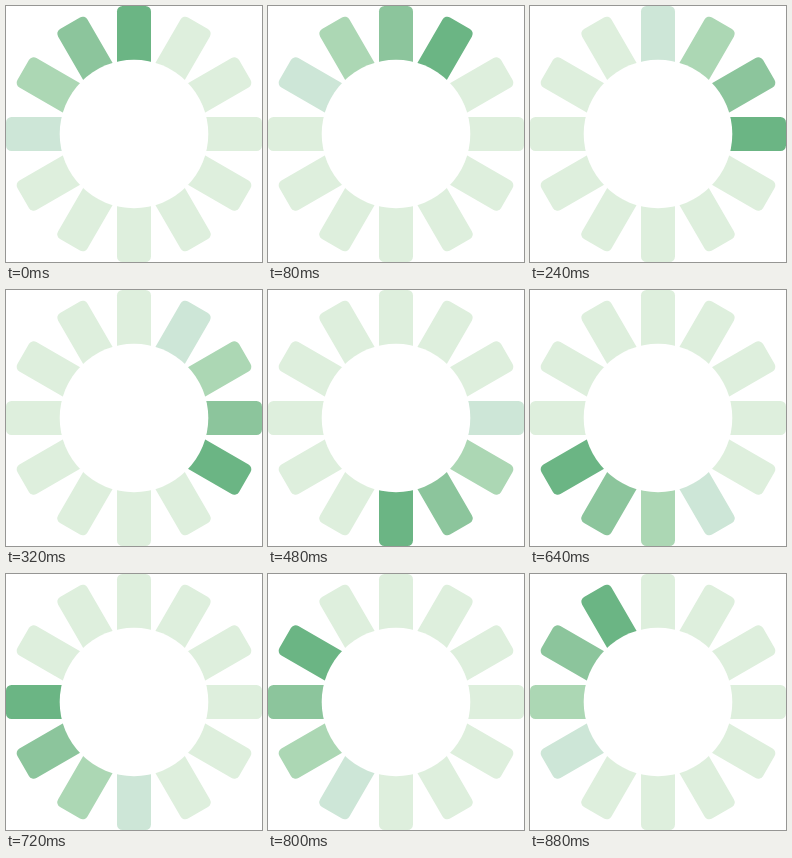
An HTML page that plays this animation: 256x256 px, repeating every 960 ms.

```html
<!DOCTYPE html>
<html lang="en">
<head>
<meta charset="utf-8">
<title>Loading spinner</title>
<style>
  html, body { margin: 0; width: 100%; height: 100%; overflow: hidden; background: #fff; }
  svg { display: block; width: 100%; height: 100%; }
  .spoke {
    fill: #deefdd;
    transform-origin: 128px 128px;
    transform: rotate(calc(var(--i) * 30deg));
    animation: fade 960ms step-end infinite;
    animation-delay: calc(var(--i) * 80ms - 960ms);
  }
  /* Stops sit just before each twelfth so steps land on time. */
  @keyframes fade {
    0%, 99.99% { fill: #6bb584; }
    8.333% { fill: #8cc59c; }
    16.666% { fill: #acd7b4; }
    24.999% { fill: #cde6d7; }
    33.333% { fill: #deefdd; }
  }
</style>
</head>
<body>
<svg viewBox="0 0 256 256">
  <g id="spokes"></g>
  <circle cx="128" cy="128" r="74.3" fill="#fff"/>
</svg>
<script>
  const spokes = document.getElementById('spokes');
  for (let i = 0; i < 12; i++) {
    const spoke = document.createElementNS('http://www.w3.org/2000/svg', 'rect');
    const box = { class: 'spoke', x: 111, y: 0, width: 34, height: 70, rx: 5.5 };
    for (const key in box) spoke.setAttribute(key, box[key]);
    spoke.style.setProperty('--i', i);
    spokes.append(spoke);
  }
</script>
</body>
</html>
```
